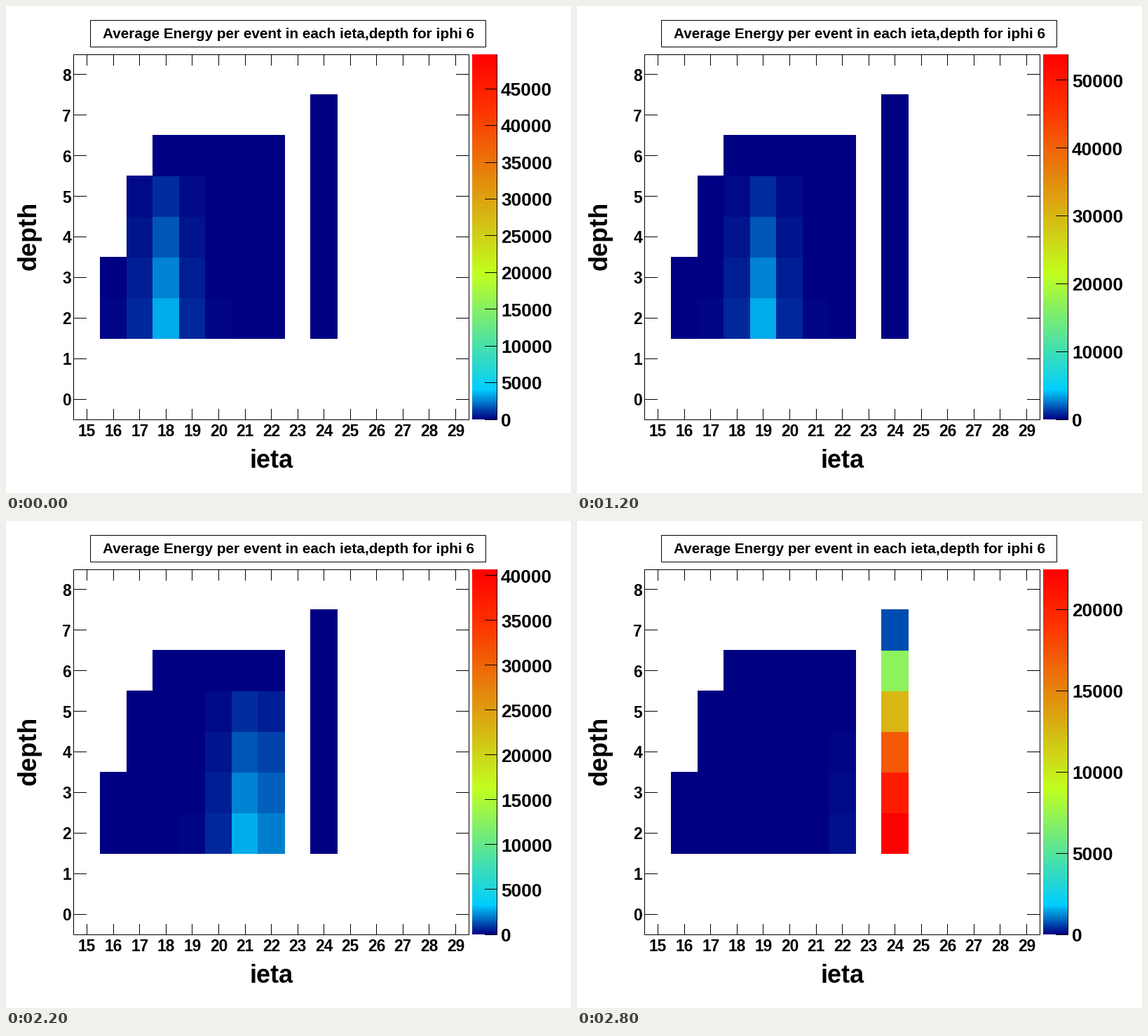
A matplotlib script for the animation above (3 s loop, 806 by 695 pixels).

```python
import math

import numpy as np
import matplotlib.pyplot as plt
from matplotlib.animation import FuncAnimation
from matplotlib.colors import LinearSegmentedColormap
from matplotlib.patches import Rectangle

W, H, DPI = 806, 695, 64
PX = 72 / DPI                      # points per pixel
LEFT, RIGHT, TOP, BOTTOM = 96.95, 660.2, 69, 590
BAR_L, BAR_R = 665, 701
STEPS, INTERVAL = 15, 200

plt.rcParams["font.family"] = "Liberation Sans"
plt.rcParams["font.weight"] = "bold"

PALETTE = LinearSegmentedColormap.from_list("energy", [
    (0.00, (0, 0, 0.51)),
    (0.08, (0, 0.81, 1)),
    (0.40, (0.76, 1, 0.12)),
    (0.85, (1, 0.2, 0)),
    (1.00, (1, 0, 0)),
], N=512)

# Upper end of the colour scale at each step
Z_MAX = [49700, 46240, 36450, 51480, 54850, 54600, 53820, 49750,
         36050, 49000, 48340, 40700, 42350, 29150, 22460]

# Highest instrumented depth of each ieta tower (all begin at depth 2)
TOWERS = {16: 3, 17: 5, 18: 6, 19: 6, 20: 6, 21: 6, 22: 6, 24: 7}
FIRST_WIDE = 22                    # wide towers catch the beam directly


def beam_at(step):
    return np.interp(step, [0, 4, 6, 10, 14], [18, 19, 19, 20, 24])


def energy(step, ieta, depth):
    """Share of the colour scale: sideways spread times fall-off with depth."""
    dist = abs(ieta - beam_at(step))
    if ieta < FIRST_WIDE:
        gain = 0.068
    else:
        gain = 1 if dist < 0.5 else 0.2
    spread = 1 / (1 + 3 * dist ** 3.3)
    reach = max(TOWERS[ieta], 6) - 1.9
    fall = 1 - ((depth - 2) / reach) ** ((reach / 4.1) ** 2)
    return gain * spread * fall


def x_at(ieta):
    return LEFT + (ieta - 14.5) * (RIGHT - LEFT) / 15


def y_at(depth):
    return BOTTOM - (depth + 0.5) * (BOTTOM - TOP) / 9


def mid(v):
    """Centre of the pixel that holds v."""
    return math.floor(v) + 0.5


fig = plt.figure(figsize=(W / DPI, H / DPI), dpi=DPI, facecolor="white")
ax = fig.add_axes([0, 0, 1, 1])
ax.axis("off")


def line(xs, ys):
    return ax.plot(xs, ys, color="black", lw=PX, solid_capstyle="butt",
                   snap=False)[0]


def hline(y, x0, x1):
    return line([x0, x1], [mid(y)] * 2)


def vline(x, y0, y1):
    return line([mid(x)] * 2, [y0, y1])


def text(x, y, s, size, ha="center", **kw):
    return ax.text(x, y, s, fontsize=size * PX, ha=ha, va="baseline", **kw)


def box(x0, y0, x1, y1):
    x0, y0, x1, y1 = map(mid, (x0, y0, x1, y1))
    ax.add_patch(Rectangle((x0, y0), x1 - x0, y1 - y0, fill=False,
                           ec="black", lw=PX, snap=False, zorder=3))


# Colour bar
ramp = PALETTE((np.arange(521)[::-1] + 0.5) / 521)[:, None, :3]
ax.imshow(ramp, extent=(BAR_L, BAR_R, 590, 69), aspect="auto",
          interpolation="nearest")
ax.set_xlim(0, W)
ax.set_ylim(H, 0)
ax.set_autoscale_on(False)
vline(BAR_R - 1, 69, 591)

# Cells, each one including the pixel at its far edge
cells = {}
for ieta, deepest in TOWERS.items():
    x0 = math.floor(x_at(ieta - 0.5))
    x1 = math.floor(x_at(ieta + 0.5)) + 1
    for depth in range(2, deepest + 1):
        y0 = math.floor(y_at(depth + 0.5))
        y1 = math.floor(y_at(depth - 0.5)) + 1
        cells[ieta, depth] = ax.add_patch(
            Rectangle((x0, y0), x1 - x0, y1 - y0, lw=0, antialiased=False))

# Frame, axes and titles
box(LEFT, TOP, RIGHT, BOTTOM)
for ieta in range(15, 30):
    x = x_at(ieta)
    vline(x, 575, 590)
    vline(x, 70, 85)
    text(x, 614, str(ieta), 22.8)
for depth in range(9):
    y = y_at(depth)
    hline(y, 97, 115)
    hline(y, 642, 660)
    text(93, y + 9, str(depth), 22.8, ha="right")

box(120, 20, 684, 58)
text(403, 46, "Average Energy per event in each ieta,depth for iphi 6", 20.7)
text(379, 659, "ieta", 36)
text(43, 328, "depth", 36, rotation=90, rotation_mode="anchor")

marks = [(hline(0, BAR_L + 18, BAR_R), text(706, 0, "", 26.2, ha="left"))
         for _ in range(11)]


def draw(step):
    for (ieta, depth), cell in cells.items():
        cell.set_facecolor(PALETTE(float(energy(step, ieta, depth))))
    top = Z_MAX[step]
    gap = 10000 if top > 50000 else 5000
    for i, (tick, label) in enumerate(marks):
        value = i * gap
        y = BOTTOM - value / top * (BOTTOM - TOP)
        tick.set_ydata([mid(y)] * 2)
        label.set_text(str(value))
        label.set_y(y + 9.8)
        for part in (tick, label):
            part.set_visible(value <= top)
    return []


anim = FuncAnimation(fig, draw, frames=STEPS, interval=INTERVAL,
                     init_func=lambda: draw(0), repeat=True, repeat_delay=0,
                     blit=False)
plt.show()
```
